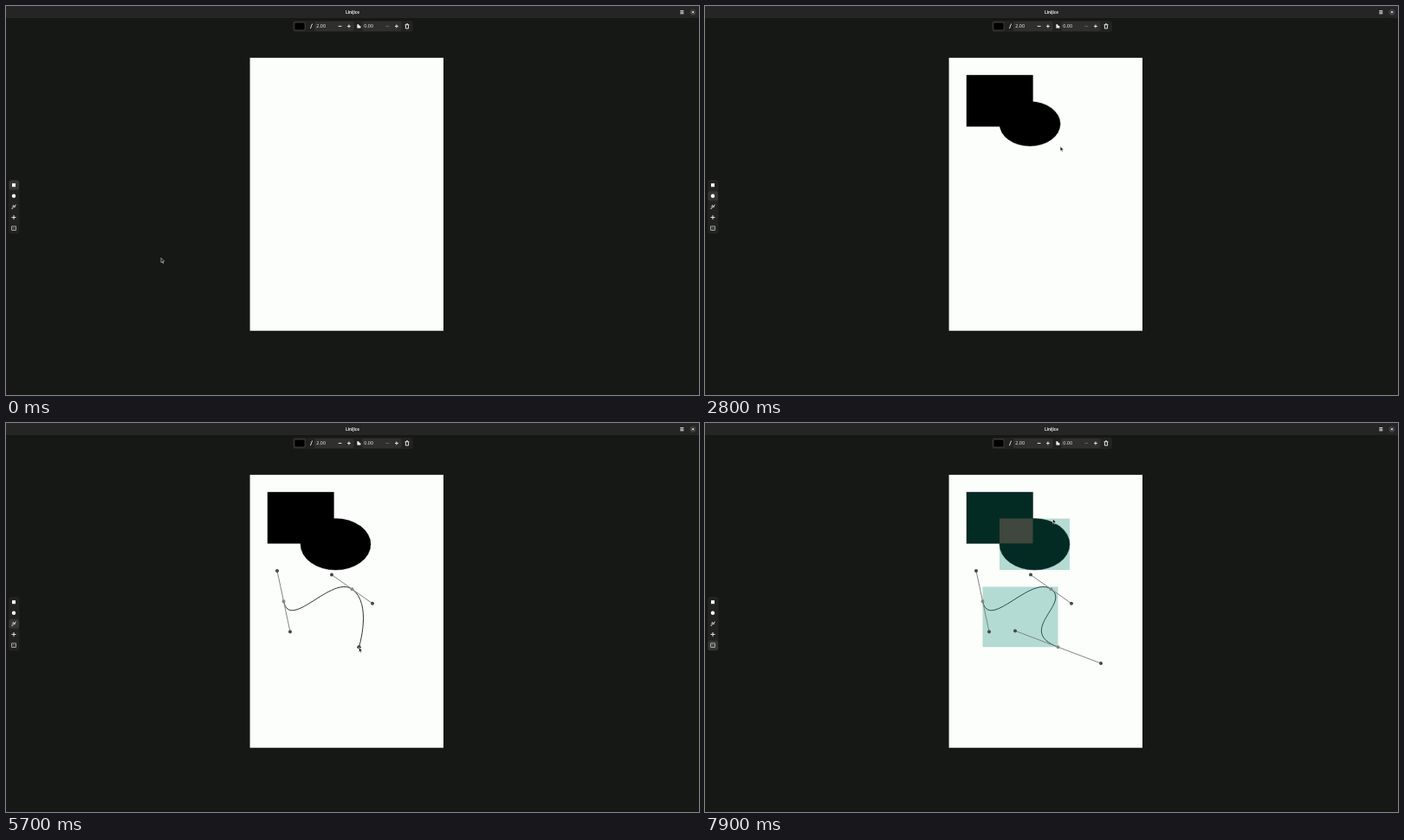
An HTML page that plays this animation: 800 by 450 pixels, repeating every 8 s.

```html
<!DOCTYPE html>
<html lang="en">
<head>
<meta charset="utf-8">
<title>Linijice</title>
<style>
  html, body { margin: 0; width: 100%; height: 100%; overflow: hidden; background: #161815; }
  svg { display: block; width: 800px; height: 450px; }
  text { fill: #f2f3f1; font: 5.4px "Open Sans", "Noto Sans", sans-serif; }
  .title { font: 700 5.1px Lato, "Open Sans", sans-serif; text-anchor: middle; }
  .header { fill: #242524; }
  .box { fill: #222321; }
  .entry { fill: #2f302e; }
  .icon { fill: none; stroke: #f4f5f3; stroke-width: .9; }
  .fine { stroke-width: .6; }
  .dim { stroke: #6a6b69; }
  .solid { fill: #fcfefc; }
  .tint { fill: #108a76; fill-opacity: .305; }
  .shape { stroke: #000; stroke-width: .4; }
  .curve { fill: none; stroke: #000; stroke-width: .8; }
  .arm { stroke: #838483; stroke-width: 1; }
  .end { fill: #454645; }
  .node { fill: #858685; }
  .cursor { fill: #0c0d0c; stroke: #f0f1ef; stroke-width: .55; stroke-linejoin: round; }
</style>
</head>
<body>
<svg viewBox="0 0 800 450">
  <rect width="800" height="450" fill="#161815"/>
  <rect class="header" width="800" height="14"/>
  <text class="title" x="400" y="8.9">Linijice</text>
  <path class="icon" d="M778.3 5.6h4M778.3 7.2h4M778.3 8.8h4"/>
  <circle cx="793" cy="7.2" r="3.7" fill="#3b3c3a"/>
  <path class="icon" d="M791.9 6.1l2.2 2.2M794.1 6.1l-2.2 2.2"/>

  <rect class="box" x="331" y="17" width="139" height="13" rx="3"/>
  <rect x="332.3" y="18.2" width="13.4" height="10.6" rx="2" fill="#3a3b39"/>
  <rect x="333.4" y="19.5" width="11.2" height="8" rx="1"/>
  <rect class="entry" x="356" y="18" width="45.5" height="11" rx="2"/>
  <rect class="entry" x="411" y="18" width="45.5" height="11" rx="2"/>
  <path class="icon" d="M351 26c1.8 0 1-5.3 3-5.3"/>
  <text x="358.3" y="25.2">2.00</text>
  <text x="413.3" y="25.2">0.00</text>
  <path class="icon" d="M383.7 23.4h3.8M394 23.4h3.8M395.9 21.5v3.8M449 23.4h3.8M450.9 21.5v3.8"/>
  <path class="icon dim" d="M438.4 23.4h3.8"/>
  <path class="solid" d="M405.4 21.2h1.7q.4 2 2.3 2.1v2.3h-4z"/>
  <path class="icon" d="M460.6 21.7h4.8M462 20.8h2M461.4 22v4h3.2v-4"/>

  <rect class="box" x="3" y="201" width="12.5" height="62.5" rx="3"/>
  <g id="buttons"></g>
  <rect class="solid" x="7" y="205.2" width="4" height="4"/>
  <circle class="solid" cx="9" cy="219.8" r="2.2"/>
  <path class="icon" d="M6.4 234.2h1c1.6 0 0-3.2 1-3.6s.6 2.6 1.5 2.4-.2-3 1.7-3"/>
  <path class="icon" d="M9 242v5M6.5 244.5h5"/>
  <rect class="icon fine" x="6.7" y="254.9" width="4.6" height="4.6"/>
  <rect class="icon fine dim" x="8" y="256.2" width="2" height="2"/>

  <rect x="281.6" y="59.9" width="223.4" height="315.8" fill="#fcfefc"/>
  <rect id="block" class="shape"/>
  <ellipse id="oval" class="shape"/>
  <path id="curve" class="curve"/>
  <g id="chosen"></g>
  <g id="handles"></g>
  <rect id="marquee" class="tint"/>
  <path id="cursor" class="cursor" d="M0 0V5.2L1.2 4.2 2 6.1 2.9 5.7 2.1 3.9 3.7 3.7Z"/>
</svg>
<script>
const STEP = 100, LOOP = 8000;

// Pointer stops: arrival step, place, rest, and what the move draws or the click picks
const stops = [
  { at: 0, x: 179, y: 291 },
  { at: 4, x: 39, y: 222 },
  { at: 8, x: 302, y: 80 },
  { at: 15, x: 378.4, y: 139.2, drag: 'block' },
  { at: 18, x: 9, y: 219, rest: 2, tool: 1 },
  { at: 24, x: 340, y: 110.6 },
  { at: 30, x: 421, y: 170, rest: 1, drag: 'oval' },
  { at: 36, x: 43, y: 243 },
  { at: 38, x: 9, y: 232, rest: 1, tool: 2 },
  { at: 43, x: 320.5, y: 206.2 },
  { at: 46, x: 328, y: 241.5, drag: 'node' },
  { at: 49, x: 399.5, y: 192.2, rest: 2 },
  { at: 54, x: 423, y: 208.8, rest: 1, drag: 'node' },
  { at: 57, x: 407.5, y: 259.2 },
  { at: 60, x: 457, y: 278, rest: 1, drag: 'node' },
  { at: 63, x: 84, y: 255 },
  { at: 67, x: 9, y: 257, rest: 3, tool: 4 },
  { at: 73, x: 250.5, y: 63 },
  { at: 76, x: 440, y: 271.5 },
  { at: 77, x: 446, y: 283 },
  { at: 79, x: 401.5, y: 110.5 }
];
const PRESS = 73, RELEASE = 78;

const leave = s => s.at + (s.rest || 0);
const easeOut = u => Math.sin(Math.min(1, Math.max(0, u)) * Math.PI / 2);

// Position on the way to stop i
function along(i, k) {
  const a = stops[Math.max(0, i - 1)], b = stops[i];
  const u = i ? easeOut((k - leave(a)) / (b.at - leave(a))) : 1;
  return { x: a.x + (b.x - a.x) * u, y: a.y + (b.y - a.y) * u };
}

function pointer(k) {
  const next = stops.findIndex(s => leave(s) >= k);
  return along(next < 0 ? stops.length - 1 : next, k);
}

const dragsOf = name => stops.flatMap((s, i) => s.drag === name ? [i] : []);
const began = (i, k) => k >= leave(stops[i - 1]);
const frame = (a, b) => ({ x: a.x, y: a.y, width: b.x - a.x, height: b.y - a.y });
const mirror = (p, c) => ({ x: 2 * c.x - p.x, y: 2 * c.y - p.y });

const byId = id => document.getElementById(id);
const set = (el, attrs) => { for (const k in attrs) el.setAttribute(k, attrs[k]); };
const show = (el, on) => el.setAttribute('visibility', on ? 'visible' : 'hidden');

function add(parent, tag, attrs) {
  const el = document.createElementNS('http://www.w3.org/2000/svg', tag);
  set(el, attrs);
  return parent.appendChild(el);
}

const [block] = dragsOf('block'), [oval] = dragsOf('oval'), nodes = dragsOf('node');

const buttonY = i => 207.2 + 12.5 * i;
const buttons = [0, 1, 2, 3, 4].map(i =>
  add(byId('buttons'), 'rect', { x: 3.5, y: buttonY(i) - 5.5, width: 11.5, height: 11, rx: 2.5 }));

const handles = nodes.map(() => {
  const g = add(byId('handles'), 'g', {});
  return {
    g,
    arm: add(g, 'line', { class: 'arm' }),
    node: add(g, 'circle', { class: 'node', r: 1.9 }),
    ends: [0, 1].map(() => add(g, 'circle', { class: 'end', r: 2 }))
  };
});

const tints = ['block', 'oval', 'curve'].map(id =>
  ({ shape: byId(id), rect: add(byId('chosen'), 'rect', { class: 'tint' }) }));
add(byId('chosen'), 'rect', { ...frame(stops[oval - 1], stops[block]), fill: '#40473c' });

function drawTools(k, p) {
  const tool = stops.reduce((t, s) => s.tool && leave(s) <= k ? s.tool : t, 0);
  buttons.forEach((b, i) => {
    const hover = Math.hypot(p.x - 9, p.y - buttonY(i)) < 6;
    b.setAttribute('fill', i === tool || hover ? '#363735' : 'none');
  });
}

function drawShapes(k) {
  const box = i => frame(stops[i - 1], along(i, k));
  const o = box(oval), rx = o.width / 2, ry = o.height / 2;
  set(byId('block'), box(block));
  set(byId('oval'), { cx: o.x + rx, cy: o.y + ry, rx, ry });
  show(byId('block'), began(block, k));
  show(byId('oval'), began(oval, k));
}

function drawCurve(k) {
  let d = '', last;
  nodes.forEach((n, i) => {
    const h = handles[i], on = began(n, k);
    show(h.g, on && (k < PRESS || k >= RELEASE));
    if (!on) return;
    const c = stops[n - 1], out = along(n, k), back = mirror(out, c);
    d += last ? `C${last.x} ${last.y} ${back.x} ${back.y} ${c.x} ${c.y}` : `M${c.x} ${c.y}`;
    last = out;
    set(h.arm, { x1: back.x, y1: back.y, x2: out.x, y2: out.y });
    set(h.node, { cx: c.x, cy: c.y });
    [back, out].forEach((p, j) => set(h.ends[j], { cx: p.x, cy: p.y }));
  });
  byId('curve').setAttribute('d', d);
}

function drawSelection(k, p) {
  const dragging = k >= PRESS && k < RELEASE, done = k >= RELEASE;
  show(byId('marquee'), dragging);
  show(byId('chosen'), done);
  if (dragging) set(byId('marquee'), frame(stops.find(s => s.at === PRESS), p));
  if (done) tints.forEach(({ shape, rect }) => {
    const { x, y, width, height } = shape.getBBox();
    set(rect, { x, y, width, height });
  });
}

function draw(k) {
  const p = pointer(k);
  drawTools(k, p);
  drawShapes(k);
  drawCurve(k);
  drawSelection(k, p);
  byId('cursor').setAttribute('transform', `translate(${p.x} ${p.y + .5})`);
}

const start = performance.now();
function tick() {
  draw(Math.floor((performance.now() - start) % LOOP / STEP));
  requestAnimationFrame(tick);
}
tick();
</script>
</body>
</html>
```
